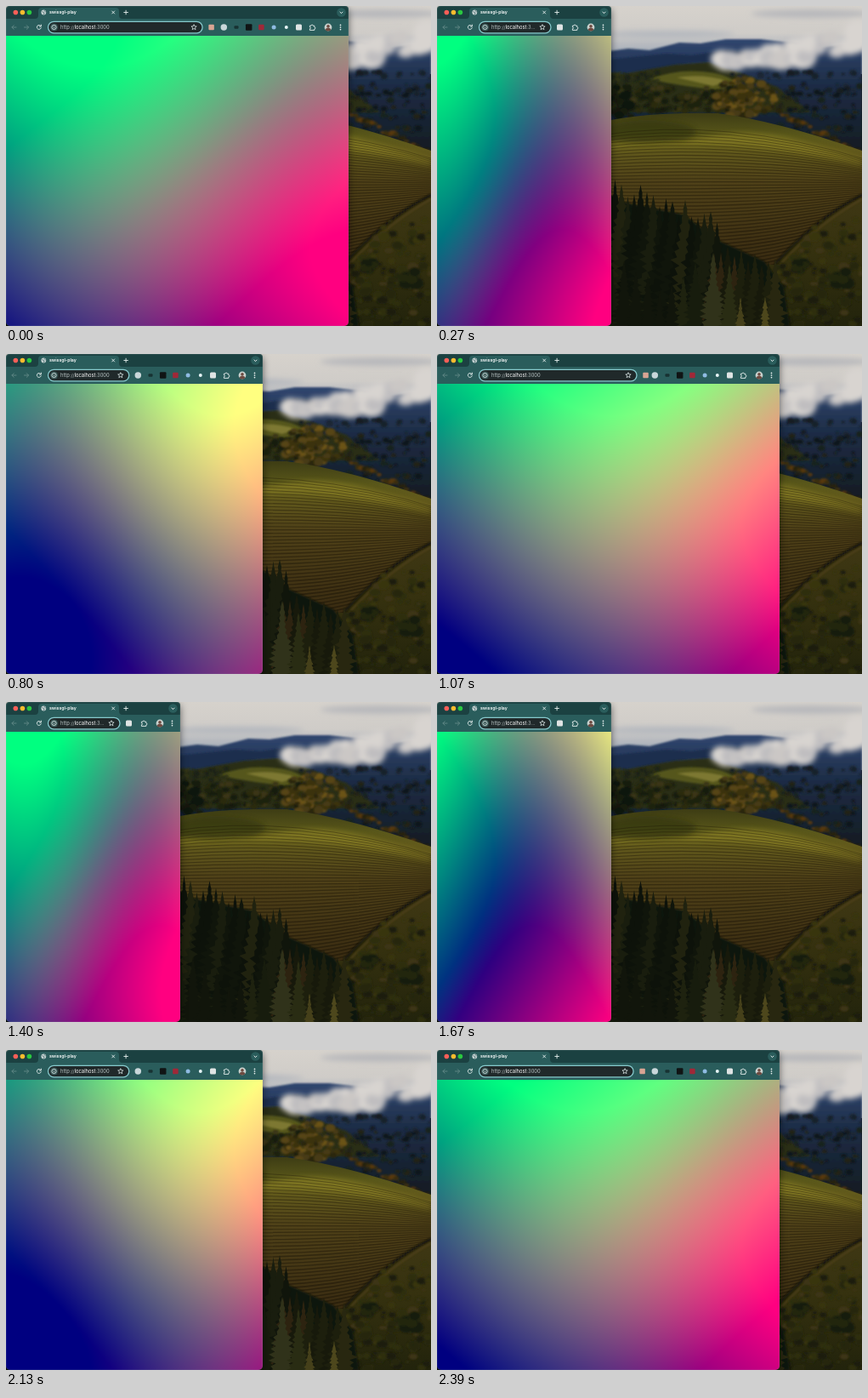
Animation of 500x376 px, one loop 2.51 s. Source, as an HTML page with a canvas:

```html
<!DOCTYPE html>
<html>
<head>
<meta charset="utf-8">
<style>
html, body { margin: 0; width: 100%; height: 100%; overflow: hidden; background: #10180f; }
svg, canvas, #shade { position: absolute; left: 0; top: 0; display: block; }
#shade { height: 376px; border-radius: 5px; box-shadow: 0 3px 8px rgba(0,0,0,.55); }
canvas { top: 35px; border-radius: 0 0 5px 5px; }
text { font-family: Inter, "Open Sans", sans-serif; }
</style>
</head>
<body>
<svg id="land" width="500" height="376" viewBox="0 0 500 376">
  <defs>
    <filter id="b1" x="-30%" y="-30%" width="160%" height="160%"><feGaussianBlur stdDeviation=".8"/></filter>
    <filter id="b3" x="-50%" y="-80%" width="200%" height="260%"><feGaussianBlur stdDeviation="3"/></filter>
    <linearGradient id="sky" x1="0" y1="0" x2="0" y2="1">
      <stop offset="0" stop-color="#d6d2cc"/><stop offset=".4" stop-color="#cfccc8"/><stop offset=".7" stop-color="#a3abb8"/>
    </linearGradient>
    <linearGradient id="mount" x1="0" y1="0" x2="0" y2="1">
      <stop offset="0" stop-color="#30466f"/><stop offset=".4" stop-color="#1d2c45"/><stop offset="1" stop-color="#131b20"/>
    </linearGradient>
    <linearGradient id="field" x1="0" y1="0" x2="0" y2="1">
      <stop offset="0" stop-color="#3d3c14"/><stop offset=".15" stop-color="#59571a"/><stop offset=".24" stop-color="#625a1c"/>
      <stop offset=".45" stop-color="#4f4118"/><stop offset="1" stop-color="#392b11"/>
    </linearGradient>
    <linearGradient id="grass" x1="0" y1="0" x2="0" y2="1">
      <stop offset="0" stop-color="#433a16"/><stop offset=".5" stop-color="#35310f"/><stop offset="1" stop-color="#22230c"/>
    </linearGradient>
    <clipPath id="fieldClip"><path id="fieldShape" d="M195,136 Q250,124 330,126 Q400,135 500,170 V224 Q440,255 398,304 H195Z"/></clipPath>
  </defs>
  <rect width="500" height="80" fill="url(#sky)"/>
  <g filter="url(#b3)">
    <ellipse cx="270" cy="33" rx="80" ry="4" fill="#b3b7be"/>
    <ellipse cx="440" cy="9" rx="70" ry="5" fill="#b7b8bb"/>
  </g>
  <path d="M195,54 L225,50 250,52 285,43 310,44 340,39 380,39 415,43 450,48 500,46 V176 H195Z" fill="url(#mount)" filter="url(#b1)"/>
  <path d="M195,64 L230,60 270,56 300,58 340,52 380,57 340,66 300,66 250,76 195,80Z" fill="#1c2d4d" filter="url(#b1)"/>
  <path d="M195,84 L240,76 280,69 320,66 350,76 400,95 440,125 H195Z" fill="#2a2f19" filter="url(#b1)"/>
  <g id="fog" filter="url(#b3)"></g>
  <path d="M250,86 Q280,74 312,77 Q340,79 352,90 L335,99 Q290,95 250,86Z" fill="#54561f" filter="url(#b1)"/>
  <path d="M282,84 Q312,79 342,88 L325,94Z" fill="#7d7831" filter="url(#b1)"/>
  <g id="copse" filter="url(#b1)"></g>
  <rect x="195" y="200" width="305" height="176" fill="url(#grass)"/>
  <use href="#fieldShape" fill="url(#field)"/>
  <g clip-path="url(#fieldClip)">
    <path d="M195,160 Q270,163 320,153 T430,160 L500,180 V188 Q400,164 320,164 T195,167Z" fill="#8f8428" opacity=".65" filter="url(#b3)"/>
    <path d="M195,142 Q240,128 290,139 Q320,148 290,157 Q240,163 195,157Z" fill="#2f3011" opacity=".6" filter="url(#b3)"/>
    <g id="rows" fill="none" stroke="#1d1608"></g>
  </g>
  <path d="M500,222 Q445,250 398,303" fill="none" stroke="#17160a" stroke-width="3" filter="url(#b1)"/>
  <path d="M500,227 Q450,255 406,301" fill="none" stroke="#5c4820" stroke-width="2" opacity=".6" filter="url(#b1)"/>
  <g id="scrub" filter="url(#b1)"></g>
  <path d="M195,225 L240,235 290,245 330,275 385,300 408,330 415,376 H195Z" fill="#11150b" filter="url(#b1)"/>
  <g id="pines"></g>
</svg>
<div id="shade"></div>
<canvas id="view" height="341"></canvas>
<svg id="chrome" width="500" height="376" viewBox="0 0 500 376">
  <path id="strip" fill="#1b4141"/>
  <rect id="bar" y="15" height="20" fill="#2a5d5c"/>
  <path d="M34,15 Q38,15 38,11 V6 Q38,2 42,2 H129 Q133,2 133,6 V11 Q133,15 137,15Z" fill="#2a5d5c"/>
  <circle cx="11.3" cy="7.5" r="2.8" fill="#fb5f58"/>
  <circle cx="19.4" cy="7.5" r="2.8" fill="#fdbc2e"/>
  <circle cx="27.4" cy="7.5" r="2.8" fill="#2ac840"/>
  <circle cx="44.3" cy="7.5" r="2.9" fill="#c3d0d0"/>
  <path d="M42.5,6.5 L45,8 44.5,10 M45,5 L46.6,7.3" stroke="#486b6b" stroke-width=".8" fill="none"/>
  <text x="51" y="9.4" font-size="5.2" font-weight="600" fill="#fff">swissgl-play</text>
  <g fill="none" stroke="#e7f0ef" stroke-width=".9" stroke-linecap="round">
    <path d="M124.7,6 l3,3 m0,-3 l-3,3 M138.8,7.5 h4.6 m-2.3,-2.3 v4.6"/>
    <path d="M12,25 h-5 m2.2,-2.3 l-2.3,2.3 2.3,2.3 M21.5,25 h5 m-2.2,-2.3 l2.3,2.3 -2.3,2.3" stroke="#648987"/>
    <path d="M41,23.6 a2.5,2.5 0 1 0 .3,2 M41.3,22 v2 h-2"/>
  </g>
  <rect id="omni" x="49.5" y="18.3" height="13.6" rx="6.8" fill="#20292a" stroke="#86c9cc" stroke-width="1.3"/>
  <circle cx="56.5" cy="25" r="4.6" fill="#375554"/>
  <circle cx="56.5" cy="25" r="2.6" fill="none" stroke="#e3efef" stroke-width=".8"/>
  <path d="M56.5,24.8 v1.4 m0,-2.6 v.5" stroke="#e3efef" stroke-width=".7"/>
  <text x="64" y="27.1" font-size="5.8" fill="#b8c3c3">http://<tspan fill="#fff">localhost</tspan><tspan id="port"></tspan></text>
  <path id="star" fill="none" stroke="#dce7e7" stroke-width=".8" stroke-linejoin="round"/>
  <g id="icons"></g>
  <g id="right">
    <circle cx="-8.5" cy="7.5" r="5.3" fill="#2a5d5c"/>
    <path d="M-10.3,6.8 l1.8,1.8 1.8,-1.8" fill="none" stroke="#fff" stroke-width=".9"/>
    <path d="M-45.6,23.2 h1.6 a1.1,1.1 0 0 1 2.2,0 h1.6 v1.6 a1.1,1.1 0 0 1 0,2.2 v1.4 h-5.4 v-1.6 a1,1 0 0 0 0,-2z" fill="none" stroke="#e7f0ef" stroke-width=".9"/>
    <circle cx="-24" cy="25" r="4.4" fill="#c9d2ce"/>
    <path d="M-27.4,27.9 Q-27,25.8 -24,25.8 T-20.6,27.9 Q-22,29.4 -24,29.4 T-27.4,27.9Z" fill="#6d4a40"/>
    <circle cx="-24" cy="23.9" r="1.8" fill="#6d4a40"/>
    <g fill="#eef5f4"><circle cx="-9.5" cy="22.4" r=".85"/><circle cx="-9.5" cy="25" r=".85"/><circle cx="-9.5" cy="27.6" r=".85"/></g>
  </g>
  <path id="rim" fill="none" stroke="#9fb5b5" stroke-opacity=".2" stroke-width=".7"/>
</svg>
<script>
const $ = id => document.getElementById(id);
function add(parent, tag, attrs) {
  const el = document.createElementNS('http://www.w3.org/2000/svg', tag);
  for (const k in attrs) el.setAttribute(k, attrs[k]);
  return parent.appendChild(el);
}
function random(seed) {
  return () => (seed = (seed * 16807) % 2147483647) / 2147483647;
}

function plant() {
  const r = random(4711), pick = list => list[Math.floor(r() * list.length)];
  const blob = (parent, cx, cy, size, fill) =>
    add($(parent), 'ellipse', { cx, cy, rx: size, ry: size * (.6 + r() * .3), fill });

  // fog bank climbing to the right
  for (let i = 0; i < 34; i++) {
    const s = i / 33;
    blob('fog', 335 + s * 165, 66 - s * 26 + (r() - .5) * (8 + s * 30), 7 + r() * 9,
      pick(['#cbc7c5', '#d8d4d0', '#bfbec0']));
  }

  const thicket = (n, x, y, w, h, size, fills) => {
    for (let i = 0; i < n; i++) blob('copse', x + r() * w, y + r() * h, size * (.5 + r()), pick(fills));
  };
  thicket(60, 345, 78, 155, 30, 3, ['#16212c', '#1b2836', '#121a21']);
  thicket(70, 400, 92, 100, 60, 3, ['#11191c', '#19221f', '#222413']);
  thicket(90, 200, 78, 60, 22, 2.5, ['#252c18', '#333417', '#1a2114']);
  thicket(140, 200, 96, 145, 28, 3.5, ['#151a0d', '#292a10', '#3b3613', '#1c200e']);
  thicket(20, 200, 94, 28, 36, 5, ['#0e120b', '#151a0d']);
  for (let i = 0; i < 110; i++) {
    const a = r() * 6.28, d = Math.sqrt(r());
    blob('copse', 360 + 38 * d * Math.cos(a), 108 + 23 * d * Math.sin(a), 2 + r() * 4,
      pick(['#574515', '#6b5219', '#3b3211', '#292610', '#473b13']));
  }
  for (let i = 0; i < 26; i++)
    blob('copse', 395 + i * 4, 118 + i * 2 + r() * 9, 2 + r() * 3, pick(['#57390f', '#3b2e0f', '#272411']));

  for (let i = 0; i < 44; i++) {
    const y = 140 + i * 3.7 + i * i * .008, sag = -22 + i * 1.9;
    add($('rows'), 'path', {
      d: `M190,${y + 12 - i * .35} Q${340 + i * .7},${y + sag * .5} 510,${y + 42 - i * 2.2}`,
      'stroke-width': .9 + i * .018, opacity: .4 + i * .004
    });
  }

  for (let i = 0; i < 170; i++) {
    const x = 385 + r() * 115, y = 250 + r() * 126;
    if (x + y * .8 > 650) blob('scrub', x, y, 2 + r() * 5, pick(['#1d1f0c', '#2d2e0f', '#3d3414', '#25270d', '#37340f']));
  }
  for (let i = 0; i < 14; i++) {
    blob('scrub', 466 + r() * 18, 312 + r() * 18, 4 + r() * 5, pick(['#181c0b', '#222610']));
    blob('scrub', 423 + r() * 10, 300 + r() * 12, 3 + r() * 4, pick(['#181c0b', '#222610']));
  }

  const pine = (x, top, height, fill) => {
    const left = [], right = [], n = 14;
    for (let i = 1; i <= n; i++) {
      const y = top + height * i / n, w = height * .2 * i / n * (.7 + r() * .6);
      left.unshift(`${x - w},${y}`, `${x - w * .55},${y - 3}`);
      right.push(`${x + w * .55},${y - 3}`, `${x + w},${y}`);
    }
    add($('pines'), 'polygon', { points: [`${x},${top}`, ...right, ...left].join(' '), fill });
  };
  for (let i = 0; i < 18; i++)
    pine(202 + i * 7.5, 196 + i * 2.6 + r() * 22, 115 + r() * 30, pick(['#10150b', '#191d0e', '#20220f', '#0d120a']));
  for (let i = 0; i < 10; i++)
    pine(326 + i * 8, 268 + r() * 26 + i * 3, 90, pick(['#1d1f0d', '#282710', '#17190b', '#2d2310']));
  for (let i = 0; i < 9; i++)
    pine(206 + i * 14, 300 + r() * 40, 75, pick(['#171c0d', '#11150b', '#1e220f']));
  pine(325, 290, 95, '#30321a');
  pine(344, 304, 85, '#292c13');
  pine(357, 343, 60, '#45401a');
  pine(386, 342, 60, '#4d471c');
}
plant();

const LOOP = 2510, STEP = 66.25, GAP = 14.7, SLIDE = 150;
// start, window width, toolbar icons shown
const SIZES = [
  [-400, 403, 8], [60, 205, 1], [507, 302, 7], [950, 403, 8],
  [1380, 205, 1], [1798, 302, 7], [2235, 403, 8]
];
// width, height, corner radius, colour; right to left
const ICONS = [
  [7, 7, 1.5, '#dfe4e4'], [4, 4, 2, '#e6f4f6'], [5, 5, 2.5, '#8fbbe2'], [6.5, 6.5, 1, '#a02838'],
  [7.5, 7.5, 1, '#101414'], [5, 3.5, 1, '#173232'], [7.5, 7.5, 3.7, '#c9d7da'], [6.5, 6.5, 1, '#d8a493']
].map(([w, h, rx, fill]) => add($('icons'), 'rect', { x: -w / 2, y: 25 - h / 2, width: w, height: h, rx, fill }));
ICONS.forEach(el => $('icons').prepend(el));

const view = $('view'), ctx = view.getContext('2d');
const wave = (s, t) => .25 * Math.sin(2.5 + 5 * t + 4 * (s - .5)) - .1;
const ramp = s => .5 + .9 * (s - .5);

function paint(w, t) {
  const h = 341, img = ctx.createImageData(w, h), px = img.data, lift = [];
  for (let x = 0; x < w; x++) lift[x] = wave((x + .5) / w, t);
  for (let y = 0, i = 0; y < h; y++) {
    const v = 1 - (y + .5) / h, push = wave(v, t);
    for (let x = 0; x < w; x++, i += 4) {
      px[i] = 255 * (ramp((x + .5) / w) + push);
      px[i + 1] = 255 * (ramp(v) + lift[x]);
      px[i + 2] = 128;
      px[i + 3] = 255;
    }
  }
  ctx.putImageData(img, 0, 0);
}

function starPath(cx, cy) {
  let d = '';
  for (let i = 0; i < 10; i++) {
    const a = i * Math.PI / 5, q = i % 2 ? 1.5 : 3.3;
    d += (i ? 'L' : 'M') + (cx + q * Math.sin(a)) + ',' + (cy - q * Math.cos(a));
  }
  return d + 'Z';
}

function layout(ms) {
  let k = 0;
  while (k + 1 < SIZES.length && SIZES[k + 1][0] <= ms) k++;
  const [start, w, count] = SIZES[k];
  const before = Math.min(count, k ? SIZES[k - 1][2] : count);
  const p = Math.min(1, (ms - start) / SLIDE);
  const offset = i => GAP * (i < before ? i : before - 1 + (i - before + 1) * p);
  const base = w - (w < 300 ? 60.5 : 58.5);

  ICONS.forEach((el, i) => {
    el.style.display = i < count ? '' : 'none';
    el.setAttribute('transform', `translate(${base - offset(i)})`);
  });
  const end = base - offset(count - 1) - 10.5;
  $('omni').setAttribute('width', end - 49.5);
  $('star').setAttribute('d', starPath(end - 10, 25));
  $('port').textContent = w < 300 ? ':3...' : ':3000';
  $('right').setAttribute('transform', `translate(${w})`);
  $('strip').setAttribute('d', `M0,15 V4 Q0,0 4,0 H${w - 4} Q${w},0 ${w},4 V15Z`);
  $('bar').setAttribute('width', w);
  $('rim').setAttribute('d', `M${w - 4},.4 Q${w - .4},.4 ${w - .4},4 V371 Q${w - .4},375.6 ${w - 5},375.6 H5 Q.4,375.6 .4,371 V4 Q.4,.4 4,.4Z`);
  $('shade').style.width = w + 'px';
  if (view.width !== w) view.width = w;
  return w;
}

let last = -1;
function tick() {
  const ms = Math.floor(performance.now() % LOOP / STEP) * STEP;
  if (ms !== last) {
    last = ms;
    paint(layout(ms), ms / 1000);
  }
  requestAnimationFrame(tick);
}
tick();
</script>
</body>
</html>
```
